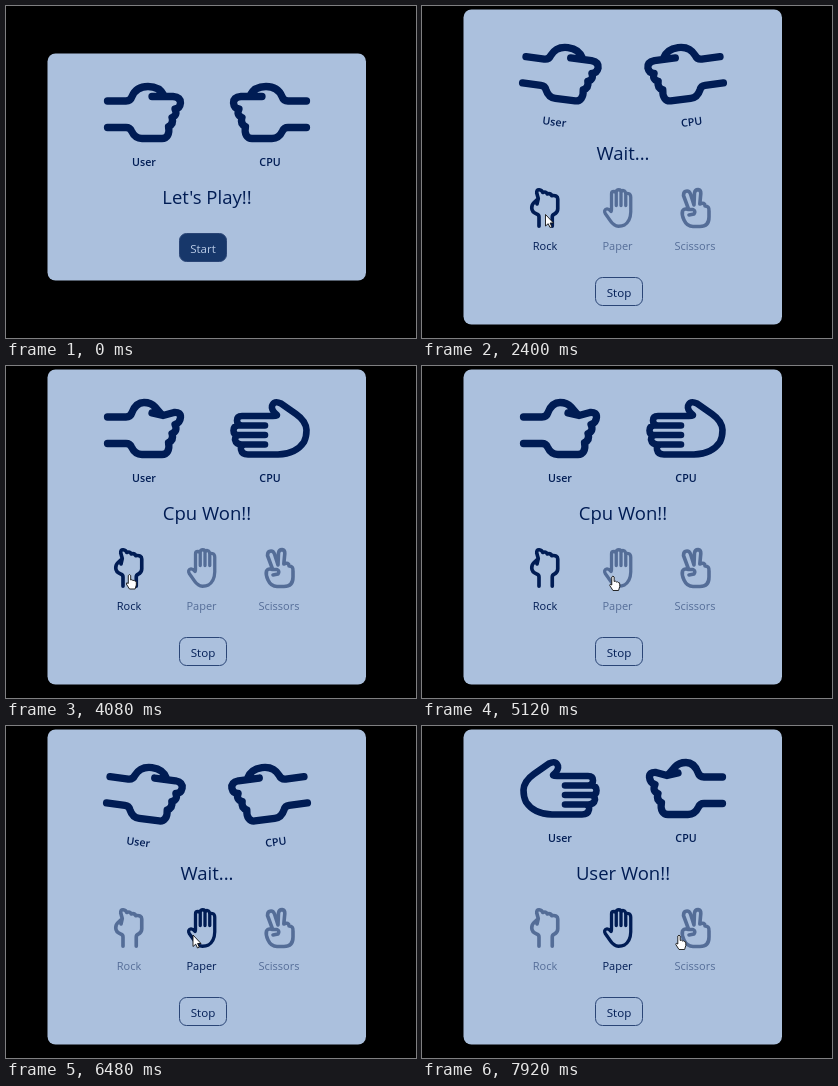
An HTML page for the animation above (8 s loop, 410 by 332 pixels).

```html
<!DOCTYPE html>
<html lang="en">
<head>
<meta charset="utf-8">
<title>Hand game</title>
<style>
  html, body { margin: 0; width: 100%; height: 100%; overflow: hidden; background: #000; }
  svg { display: block; width: 410px; height: 332px; }
  text { font-family: "Open Sans", "Noto Sans", sans-serif; text-anchor: middle; fill: #001c54; }
  .line { fill: none; stroke: #001c54; stroke-linecap: round; stroke-linejoin: round; }
  .hand { stroke-width: 7.3; }
  .palm { stroke-width: 6.6; }
  .small { stroke-width: 3.6; }
  .name { font-size: 10.7px; font-weight: 600; }
  .option text { font-size: 11px; }
  #message { font-size: 18.5px; }
  #button text { font-size: 11.6px; }
  #cursor path { fill: #fff; stroke: #111; stroke-width: .9; stroke-linejoin: round; }
</style>
</head>
<body>
<svg viewBox="0 0 410 332">
  <defs>
    <path id="idle" class="line hand" d="M101.500 51H120Q124.500 51 126 46.500C129 39.500 135 36.500 142 36.500C150 36.500 155 39.500 158 45.500M146 46.500H167Q174.500 47 174.500 53Q174 58.500 169 59Q172 65 166 67.500Q168 74 162.500 76.500C164 84 161 88.500 156 88.500H136Q129 88.500 125.500 81Q124 77.500 120 77.500H101.500"/>
    <path id="rock" class="line hand" d="M101.500 51H120Q124.500 51 126 46.500C129 39 133 36.500 138 36.500Q145 36.500 149 41L155 48M146 47L157 49.500L168 46.500Q175 46 174.500 51.500Q174 57 169 58.500Q172 65 166 67.500Q168 74 162.500 76.500C164 84 161 88.500 156 88.500H136Q129 88.500 125.500 81Q124 77.500 120 77.500H101.500"/>
    <path id="paper" class="line palm" d="M101.500 64Q102 55 112 48L127 37.500Q134 34 136 40Q137 44 131 49Q131 50 135 50H166Q171 50 171 54.500Q171 59.500 166 59.500H143M166 59.500H170Q174.500 60 174.500 64.500Q174.500 69 170 69H143M168 69Q173 69 173 73.500Q172 78.500 166 78.500H143M163 78.500Q168 79 167 83.500Q166 88.500 160 88.500H130Q112 88 104 76Q101.500 71 101.500 64"/>
  </defs>

  <rect id="card" x="41.5" width="318.500" rx="8" fill="#abc0dd"/>

  <g id="top">
    <g id="user">
      <use id="userHand" href="#idle"/>
      <text class="name" x="138" y="115.800">User</text>
    </g>
    <g id="cpu">
      <use id="cpuHand" href="#idle" transform="matrix(-1 0 0 1 402 0)"/>
      <text class="name" x="264" y="115.800">CPU</text>
    </g>
    <text id="message" x="201" y="153.700"></text>
    <g id="options">
      <g class="option">
        <use href="#rock" transform="matrix(0 -.5 .5 0 91.500 271)"/>
        <text x="123" y="244.200">Rock</text>
      </g>
      <g class="option">
        <use href="#paper" transform="matrix(0 -.5 .5 0 164.500 271)"/>
        <text x="195.500" y="244.200">Paper</text>
      </g>
      <g class="option">
        <path class="line small" d="M266.500 203L261.500 189.500Q261.500 185 265 185Q267.500 185 268.500 188L272 199L272.500 187Q273 183.600 276 183.600Q279 184 278.800 187.500L277.800 198Q283 196 283 200Q287.500 200 287 205V211Q287 220.500 278 220.500H271Q265 220.500 262 214Q259.500 209 260.500 205Q262 202 266.500 203.500H271Q274 205 272 208L267 209"/>
        <text x="273" y="243.700">Scissors</text>
      </g>
    </g>
  </g>

  <g id="button">
    <rect id="fill" x="173.500" y="227.500" width="47" height="28" rx="7" fill="#17376a"/>
    <rect x="173.500" y="227.500" width="47" height="28" rx="7" fill="none" stroke="#2a4576"/>
    <text id="caption" x="197" y="246.500"></text>
  </g>

  <g id="cursor">
    <path id="arrow" d="M0 0V11.500L2.700 9.200L4.500 13L6.300 12.200L4.600 8.500H8Z"/>
    <path id="pointer" d="M-1.200 1Q0-.8 1.200 1V5.500Q2.500 4.500 3.400 6Q4.800 5.200 5.300 6.600Q6.800 6.200 6.800 8V10.500L5.600 14.500H0L-3.200 9.500Q-3.200 7.200-1.200 9Z"/>
  </g>
</svg>

<script>
const LOOP = 8000, OPEN = 160, OPEN_TIME = 400, GROWTH = 44;
const SHAKE = 700, WAIT = 2000, ANGLE = 7.5;
const rounds = [
  { start: 2040, user: 'rock', cpu: 'paper', choice: 0, result: 'Cpu Won!!' },
  { start: 5430, user: 'paper', cpu: 'rock', choice: 1, result: 'User Won!!' }
];
// time, x, y of the cursor tip
const route = [
  [0, 203, 232], [1000, 203, 232], [1400, 123.5, 208.5], [4360, 123.5, 208.5],
  [4880, 191, 210], [5100, 191, 210], [5400, 187, 209], [7680, 187, 209], [7920, 257, 209]
];
const optionSpans = [[103, 143], [176, 216], [248, 298]];

const $ = id => document.getElementById(id);
const options = document.querySelectorAll('.option');
const clamp = v => Math.min(1, Math.max(0, v));
const swing = p => .5 - Math.cos(clamp(p) * Math.PI) / 2;

// cubic-bezier(.25, .1, .25, 1)
function ease(x) {
  const curve = (u, a, b) => 3 * u * (1 - u) ** 2 * a + 3 * u * u * (1 - u) * b + u ** 3;
  let low = 0, high = 1;
  for (let i = 0; i < 16; i++) {
    const mid = (low + high) / 2;
    if (curve(mid, .25, .25) < x) low = mid; else high = mid;
  }
  return curve(low, .1, 1);
}

function shakeAngle(elapsed) {
  const p = elapsed % SHAKE / SHAKE * 2;
  return ANGLE * (p < 1 ? ease(p) : 1 - ease(p - 1));
}

function cursorAt(t) {
  const i = route.findIndex(stop => stop[0] > t);
  if (i < 0) return route[route.length - 1].slice(1);
  const [t0, x0, y0] = route[i - 1], [t1, x1, y1] = route[i];
  const p = swing((t - t0) / (t1 - t0));
  return [x0 + (x1 - x0) * p, y0 + (y1 - y0) * p];
}

function drawCard(t) {
  const open = swing((t - OPEN) / OPEN_TIME);
  $('card').setAttribute('y', 47.5 - GROWTH * open);
  $('card').setAttribute('height', 227 + 2 * GROWTH * open);
  $('top').setAttribute('transform', `translate(0 ${GROWTH * (1 - open)})`);
  $('button').setAttribute('transform', `translate(0 ${GROWTH * open})`);
  $('options').setAttribute('opacity', open);
  const started = t >= OPEN;
  $('fill').setAttribute('opacity', 1 - clamp((t - OPEN) / 150));
  $('caption').textContent = started ? 'Stop' : 'Start';
  $('caption').style.fill = started ? '' : '#b8cae6';
}

function drawGame(round, waiting, elapsed) {
  const angle = waiting ? shakeAngle(elapsed) : 0;
  $('user').setAttribute('transform', `rotate(${angle} 105 70)`);
  $('cpu').setAttribute('transform', `rotate(${-angle} 297 70)`);
  const done = round && !waiting;
  $('userHand').setAttribute('href', '#' + (done ? round.user : 'idle'));
  $('cpuHand').setAttribute('href', '#' + (done ? round.cpu : 'idle'));
  $('message').textContent = !round ? "Let's Play!!" : waiting ? 'Wait...' : round.result;
  options.forEach((option, i) =>
    option.setAttribute('opacity', round && round.choice === i ? 1 : .5));
}

function drawCursor(t, waiting) {
  const [x, y] = cursorAt(t);
  const over = y < 248 && optionSpans.some(([a, b]) => x >= a && x <= b);
  const hand = over && !waiting;
  $('cursor').setAttribute('transform', `translate(${x} ${y})`);
  $('cursor').style.display = t < OPEN ? 'none' : '';
  $('arrow').style.display = hand ? 'none' : '';
  $('pointer').style.display = hand ? '' : 'none';
}

function render(t) {
  const round = rounds.filter(r => t >= r.start).pop();
  const elapsed = round ? t - round.start : 0;
  const waiting = Boolean(round) && elapsed < WAIT;
  drawCard(t);
  drawGame(round, waiting, elapsed);
  drawCursor(t, waiting);
}

const begin = performance.now();
function tick() {
  render((performance.now() - begin) % LOOP);
  requestAnimationFrame(tick);
}
tick();
</script>
</body>
</html>
```
